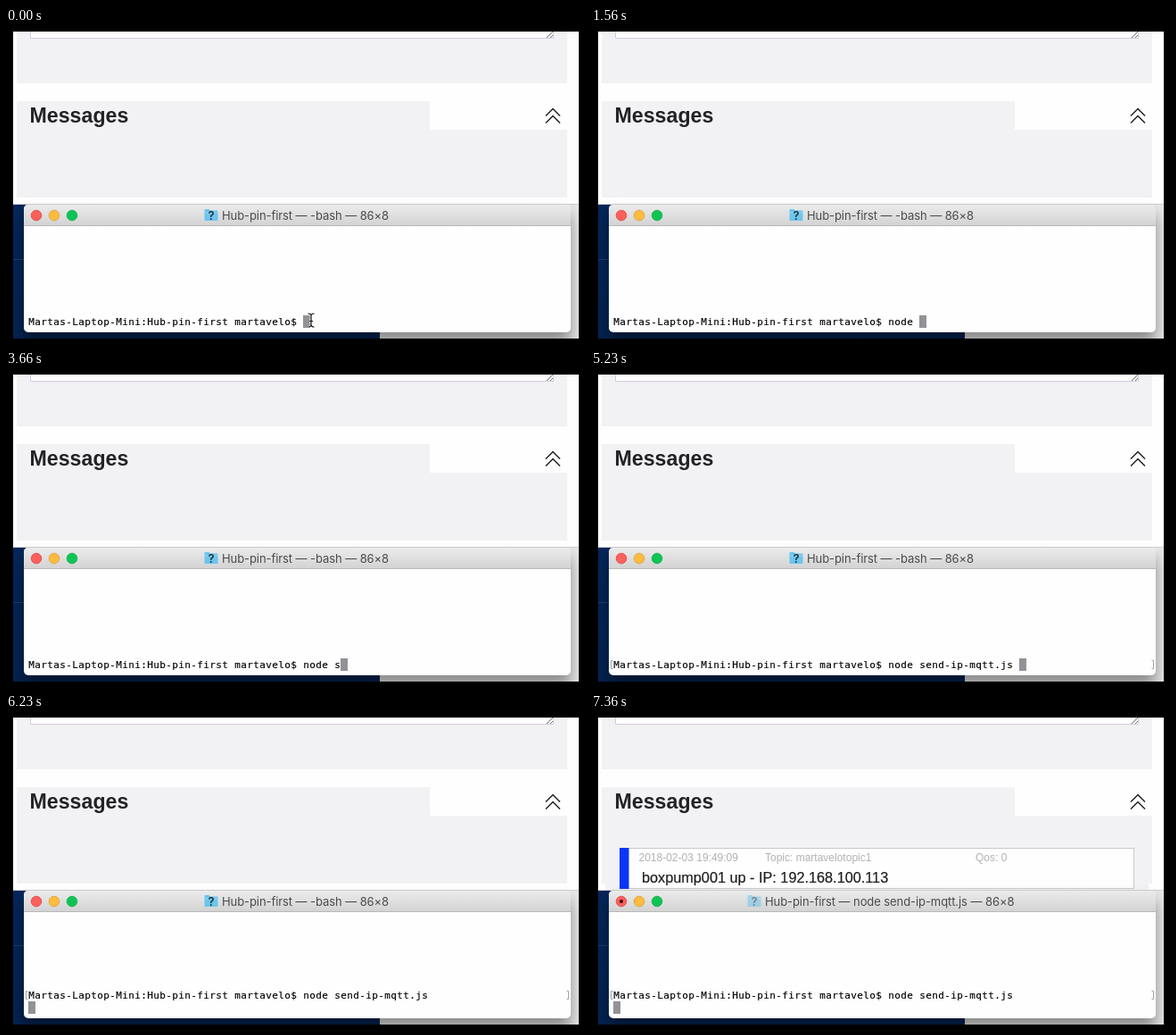
Recreate the animation shown at these times as an HTML page. Size 649 by 353 pixels, loop 8 s.

```html
<!DOCTYPE html>
<html lang="en">
<head>
<meta charset="utf-8">
<title>Terminal and messages</title>
<style>
  html, body { margin: 0; width: 100%; height: 100%; overflow: hidden; background: #000; }
  svg { display: block; width: 100%; height: 100%; }
  text { white-space: pre; }
  .mono { font: 11px "DejaVu Sans Mono", monospace; letter-spacing: .378px; fill: #000; stroke: #000; stroke-width: .15px; }
  .title { font: 13px Inter, sans-serif; letter-spacing: -.08px; fill: #4b4b4d; }
  .head { font: 700 23.2px "Liberation Sans", Arial, sans-serif; fill: #232325; }
  .meta { font: 12px "Liberation Sans", Arial, sans-serif; fill: #b2b2b4; }
  .body { font: 16.25px "Liberation Sans", Arial, sans-serif; fill: #1d1d1f; stroke: #1d1d1f; stroke-width: .2px; }
  .mark { font: 600 13px Inter, sans-serif; fill: #23313d; }
</style>
</head>
<body>
<svg viewBox="0 0 649 353" xmlns="http://www.w3.org/2000/svg">
  <defs>
    <linearGradient id="bar" x2="0" y2="1">
      <stop stop-color="#ebebeb"/><stop offset="1" stop-color="#d2d2d2"/>
    </linearGradient>
    <linearGradient id="navy" x2="0" y2="1">
      <stop stop-color="#04265a"/><stop offset="1" stop-color="#042350"/>
    </linearGradient>
    <filter id="blur" x="-10%" y="-30%" width="120%" height="160%">
      <feGaussianBlur stdDeviation="8"/>
    </filter>
    <clipPath id="screen"><rect x="8" y="4" width="634" height="344"/></clipPath>
  </defs>

  <rect width="649" height="353"/>

  <!-- page -->
  <rect x="8" y="4" width="634" height="194" fill="#fefefe"/>
  <rect x="12" y="4" width="617" height="58" fill="#f2f2f4"/>
  <path d="M27.500 4V11.500H613.500V4" fill="#fefefe" stroke="#d6c8e2"/>
  <path d="M606 11L613 4M610 11L613 8" stroke="#6b6b6b" fill="none"/>
  <path d="M12 82H475V114H629V190H12Z" fill="#f2f2f4"/>
  <text class="head" x="26.500" y="106">Messages</text>
  <path d="M605 98.500L613 90.500L621 98.500M605 106.500L613 98.500L621 106.500" fill="none" stroke="#222" stroke-width="1.500"/>

  <g id="card">
    <rect x="16" y="190" width="609" height="7" fill="#f2f2f4"/>
    <rect x="32.500" y="150.500" width="576" height="45" fill="#fefefe" stroke="#c9c9cb"/>
    <rect x="32" y="150" width="10.500" height="46" fill="#0a35f5"/>
    <text class="meta" x="53.500" y="164.500">2018-02-03 19:49:09</text>
    <text class="meta" x="195" y="164.500">Topic: martavelotopic1</text>
    <text class="meta" x="431" y="164.500">Qos: 0</text>
    <text class="body" x="57" y="188.500">boxpump001 up - IP: 192.168.100.113</text>
  </g>

  <!-- desktop -->
  <rect x="8" y="198" width="411" height="150" fill="url(#navy)"/>
  <path d="M8 259.500H20" stroke="#17406f"/>
  <rect x="419" y="198" width="223" height="150" fill="#e6e6e8"/>
  <path d="M8 197.500H642" stroke="#cfcfd2"/>

  <!-- terminal -->
  <g clip-path="url(#screen)">
    <rect x="20" y="209" width="613" height="143" rx="5" opacity=".4" filter="url(#blur)"/>
  </g>
  <rect x="20" y="198" width="613" height="143" rx="5" fill="#fefefe"/>
  <path d="M20 222V203Q20 198 25 198H628Q633 198 633 203V222Z" fill="url(#bar)"/>
  <path d="M20 221.500H633" stroke="#b9b9b9"/>
  <g stroke-width=".8">
    <circle cx="34" cy="210" r="5.800" fill="#fc605c" stroke="#e0443e"/>
    <circle cx="54" cy="210" r="5.800" fill="#fdbb40" stroke="#dea035"/>
    <circle cx="74" cy="210" r="5.800" fill="#0fc454" stroke="#0cae48"/>
  </g>
  <circle id="busy" cx="34" cy="210" r="2" fill="#3c0805"/>
  <g id="icon">
    <path d="M0 204Q0 203 1 203H5L6.500 204.500H14Q15 204.500 15 205.500V215Q15 216 14 216H1Q0 216 0 215Z" fill="#6cc5ec"/>
    <path d="M0 207H15" stroke="#93d8f4"/>
    <text class="mark" x="7.500" y="214.500" text-anchor="middle">?</text>
  </g>
  <text id="title" class="title" y="214.500"></text>

  <rect id="cursor" y="322" width="8" height="14" fill="#929297"/>
  <g id="line">
    <text id="prompt" class="mono" x="25.200" y="333"></text>
    <path id="ends" d="M24.500 324.500H22.500V333.500H24.500M628.500 324.500H630.500V333.500H628.500" fill="none" stroke="#a3a3a5"/>
  </g>
  <g id="beam" fill="none">
    <path d="M338.500 320Q342 320 342 322.500Q342 320 345.500 320M342 322V333M338.500 335Q342 335 342 332.500Q342 335 345.500 335M340 328.500H344" stroke="#fff" stroke-width="2.600"/>
    <path d="M338.500 320Q342 320 342 322.500Q342 320 345.500 320M342 322V333M338.500 335Q342 335 342 332.500Q342 335 345.500 335M340 328.500H344" stroke="#111" stroke-width="1.200"/>
  </g>
</svg>
<script>
  const LOOP = 8000, CELL = 7, LEFT = 25, LINE = 14;
  const HIDE_BEAM = 300, COMPLETE = 5230, ENTER = 6230, RUN = 6330, ARRIVE = 7360;
  const FOLDER = "Hub-pin-first";
  const PROMPT = `Martas-Laptop-Mini:${FOLDER} martavelo$ `;
  const COMMAND = "node send-ip-mqtt.js ";
  const KEYS = [370, 430, 730, 930, 1560, 3660, 3930, 4030, 4260, 4930];

  const $ = id => document.getElementById(id);
  const show = (id, on) => $(id).setAttribute("visibility", on ? "visible" : "hidden");

  function setText(id, value) {
    if ($(id).textContent !== value) $(id).textContent = value;
  }

  function draw(t) {
    const typed = t >= COMPLETE ? COMMAND.length : KEYS.filter(k => t >= k).length;
    const entered = t >= ENTER, running = t >= RUN;
    const text = PROMPT + COMMAND.slice(0, typed);

    setText("prompt", text);
    $("line").setAttribute("transform", `translate(0 ${entered ? -LINE : 0})`);
    $("cursor").setAttribute("x", LEFT + (entered ? 0 : text.length * CELL));

    setText("title", `${FOLDER} — ${running ? "node send-ip-mqtt.js" : "-bash"} — 86×8`);
    $("title").setAttribute("x", running ? 195 : 242);
    $("icon").setAttribute("transform", `translate(${running ? 175.5 : 222.5} 0)`);
    $("icon").setAttribute("opacity", running ? 0.55 : 1);

    show("beam", t < HIDE_BEAM);
    show("ends", t >= COMPLETE);
    show("busy", running);
    show("card", t >= ARRIVE);
  }

  const start = performance.now();
  function tick() {
    draw((performance.now() - start) % LOOP);
    requestAnimationFrame(tick);
  }
  tick();
</script>
</body>
</html>
```
